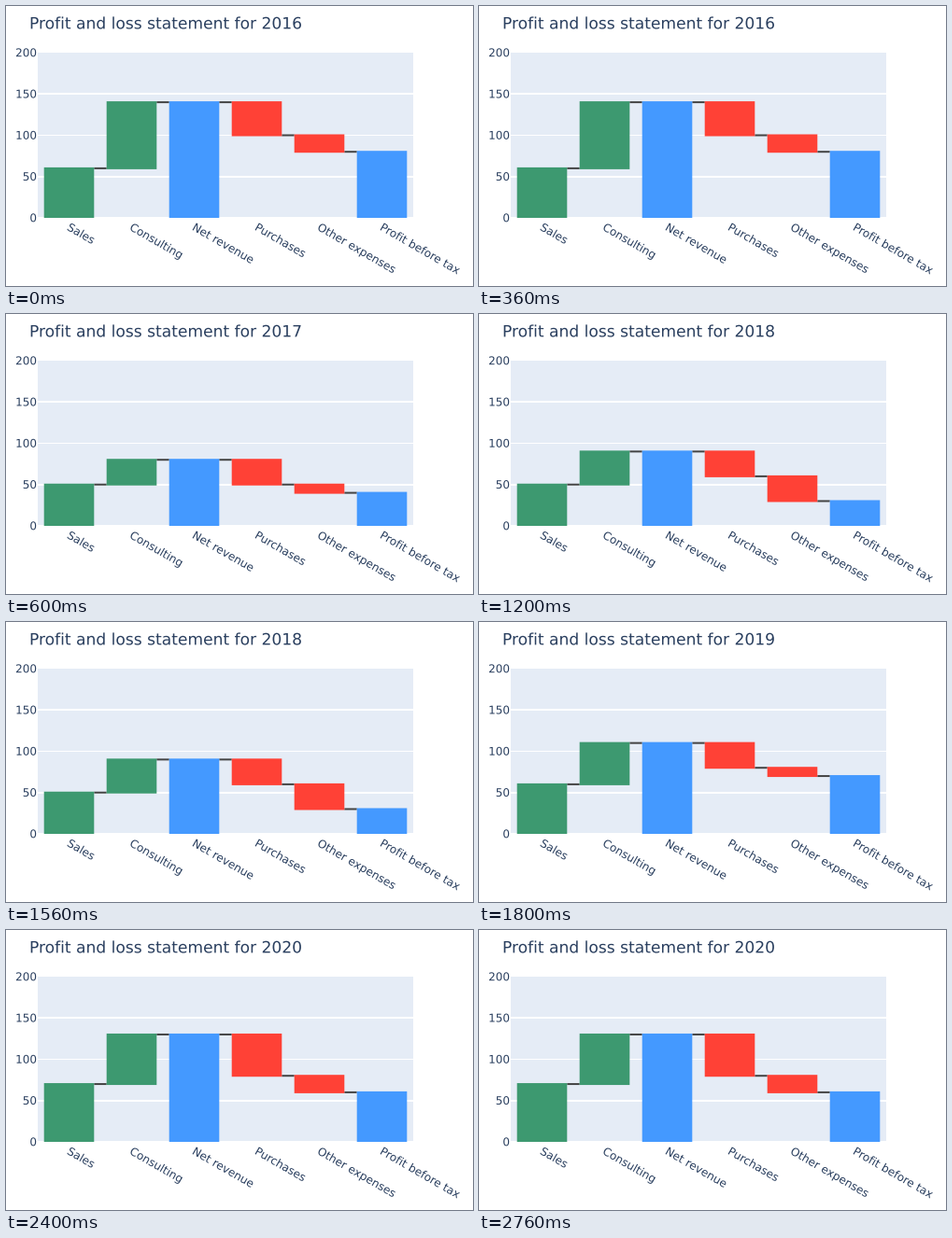
A matplotlib script for the animation above (3 s loop, 500x300 px).

```python
import matplotlib.pyplot as plt
from matplotlib.animation import FuncAnimation
from matplotlib.patches import PathPatch, Rectangle
from matplotlib.textpath import TextPath
from matplotlib.transforms import Affine2D

W, H, DPI = 500, 300, 100
LEFT, RIGHT, TOP, BASE = 34, 436, 50, 227
STEP = (RIGHT - LEFT) / 6
BAR_W = 0.8 * STEP
INK = "#2a3f5f"
GREEN, RED, BLUE = "#3d9970", "#ff4136", "#4499ff"

LABELS = ["Sales", "Consulting", "Net revenue", "Purchases",
          "Other expenses", "Profit before tax"]
# year: sales, consulting, purchases, other expenses
YEARS = {
    2016: (60, 80, -40, -20),
    2017: (50, 30, -30, -10),
    2018: (50, 40, -30, -30),
    2019: (60, 50, -30, -10),
    2020: (70, 60, -50, -20),
}

fig = plt.figure(figsize=(W / DPI, H / DPI), dpi=DPI, facecolor="white")
ax = fig.add_axes([0, 0, 1, 1])
ax.set_xlim(0, W)
ax.set_ylim(H, 0)
ax.axis("off")


def y_of(value):
    return BASE - value * (BASE - TOP) / 200


def box(x0, y0, x1, y1, color, z):
    rect = Rectangle((x0, y0), x1 - x0, y1 - y0, fc=color, lw=0,
                     zorder=z, snap=False)
    return ax.add_patch(rect)


def text_path(text, x, y, size, angle=0):
    """Outline of text whose baseline starts at (x, y)."""
    path = TextPath((0, 0), text, size=size, prop={"family": "DejaVu Sans"})
    move = Affine2D().scale(1, -1).rotate_deg(angle).translate(x, y)
    return path.transformed(move)


def write(*args, **kwargs):
    patch = PathPatch(text_path(*args, **kwargs), fc=INK, lw=0, snap=False)
    return ax.add_patch(patch)


def title_path(year):
    return text_path(f"Profit and loss statement for {year}", 25, 24.4, 17.1)


# plot area, grid and axis labels
box(LEFT, TOP, RIGHT, BASE, "#e5ecf6", 0)
for y, width in ((94, 2), (138.5, 1), (183, 2), (BASE, 2)):
    box(LEFT, y - width / 2, RIGHT, y + width / 2, "white", 1)

DIGIT = 0.636 * 12
for value in range(0, 201, 50):
    label = str(value)
    write(label, 33 - DIGIT * len(label), y_of(value) + 4.2, 12)

lefts = [LEFT + STEP * i + (STEP - BAR_W) / 2 for i in range(6)]
for x, label in zip(lefts, LABELS):
    write(label, x + BAR_W / 2 - 3, 239.4, 12, angle=30)

title = ax.add_patch(PathPatch(title_path(2016), fc=INK, lw=0, snap=False))
colors = [GREEN, GREEN, BLUE, RED, RED, BLUE]
bars = [box(x, BASE, x + BAR_W, BASE, c, 4) for x, c in zip(lefts, colors)]
links = [box(x + BAR_W, BASE, x + STEP, BASE, "#444444", 3)
         for x in lefts[:-1]]


def spans(sales, consulting, purchases, other):
    """Start and end value of each bar."""
    gross = sales + consulting
    bought = gross + purchases
    net = bought + other
    return [(0, sales), (sales, gross), (0, gross),
            (gross, bought), (bought, net), (0, net)]


def update(i):
    year = list(YEARS)[i]
    title.set_path(title_path(year))
    levels = spans(*YEARS[year])
    for bar, span in zip(bars, levels):
        top = y_of(max(span)) - 1
        bottom = min(y_of(min(span)) + 1, BASE)
        bar.set_y(top)
        bar.set_height(bottom - top)
    for link, (_, end) in zip(links, levels):
        link.set_y(y_of(end) - 1)
        link.set_height(2)
    return [title, *bars, *links]


anim = FuncAnimation(fig, update, frames=len(YEARS), interval=600,
                     repeat=True, repeat_delay=0)
plt.show()
```
